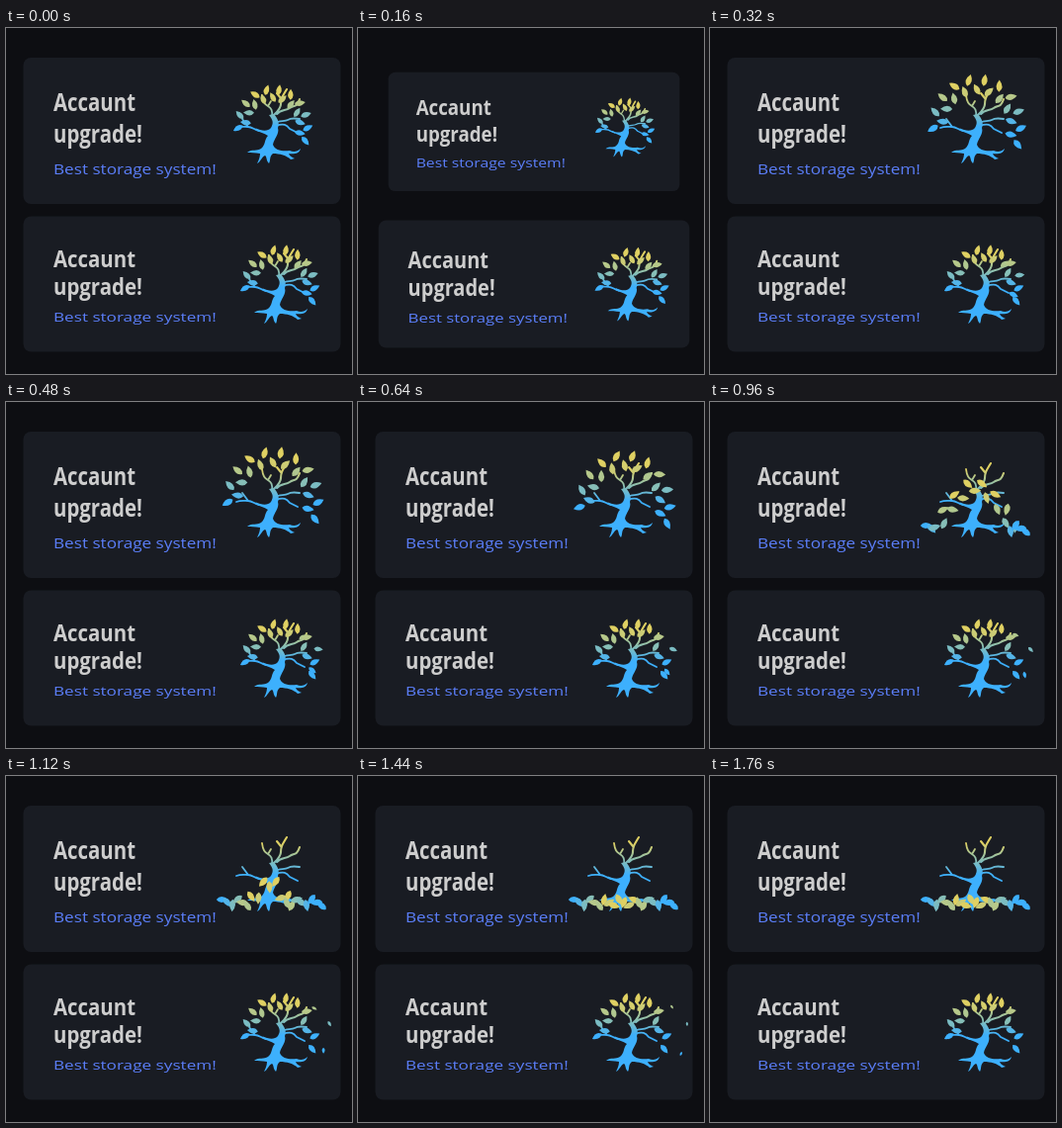
An HTML page for the animation above (1.96 s loop, 350 px wide and 350 px high).

```html
<!DOCTYPE html>
<html lang="en">
<head>
<meta charset="utf-8">
<title>Storage cards</title>
<style>
  html, body { margin: 0; width: 100%; height: 100%; overflow: hidden; background: #0d0e12; }
  svg { display: block; width: 100vw; height: 100vh; }
  text { font-family: "Open Sans", "Noto Sans", sans-serif; }
  .head { font-size: 20.4px; font-weight: 700; fill: #cdcdcd; }
  .sub { font-size: 17.15px; fill: #5b7ef8; }
  .card { fill: #191c23; }
  .twigs { fill: none; stroke: url(#bark); stroke-linecap: round; stroke-linejoin: round; }
</style>
</head>
<body>
<svg viewBox="0 0 350 350">
  <defs>
    <linearGradient id="bark" gradientUnits="userSpaceOnUse" x1="0" y1="68" x2="0" y2="100">
      <stop offset="0" stop-color="#dfd062"/>
      <stop offset="1" stop-color="#3db0fd"/>
    </linearGradient>
    <path id="leaf" d="M-5.500 0Q-1.500-5.500 5.500 0Q-1.500 5.500-5.500 0Z"/>
    <g id="tree">
      <path fill="url(#bark)" d="M244 126C249 122 254 125 258 122C263 118 261 113 265 109
        C261 106 257 106 252 103L253 101.500C258 104 265 105 268 101C271 96 270 93 266 88L271 87
        C275 92 277 96 275 101C277 107 271 112 270 118C272 124 280 125 287 124
        C291 126 295 125 298 122C297 127 291 128 286 127C287 130 290 131 292 132L288 133
        C284 129 277 127 270 127C266 130 268 134 266 137C263 134 264 130 262 129
        C258 131 258 135 254 137C256 133 257 130 257 127C252 126 248 126 244 126Z"/>
      <g class="twigs">
        <path stroke-width="1.800" d="M256 104C251 103 249 100 245 100S238 99 233 101M245 100L239 92
          M269 90C270 83 268 81 265 79S260 76 259 68M265 79L268 74
          M273 96C276 93 282 95 285 93S291 91 297 92M273 99C281 96 284 98 287 102L295 106"/>
        <path stroke-width="2.100" d="M270 89C274 85 278 82 278 77S279 70 284 62M278 71L274 66
          M274 87C278 82 283 84 287 81S294 81 297 72"/>
      </g>
    </g>
  </defs>
  <rect id="box1" class="card" x="17.500" y="30" width="321" height="148" rx="8"/>
  <g id="text1">
    <text class="head" transform="translate(48 84) scale(1 1.23)">Accaunt</text>
    <text class="head" transform="translate(48 116) scale(1 1.23)">upgrade!</text>
    <text class="sub" transform="translate(48 148) scale(1 .83)">Best storage system!</text>
  </g>
  <rect id="box2" class="card" x="17.500" y="190.500" width="321" height="137" rx="8"/>
  <g id="text2">
    <text class="head" transform="translate(48 242) scale(1 1.1)">Accaunt</text>
    <text class="head" transform="translate(48 270) scale(1 1.1)">upgrade!</text>
    <text class="sub" transform="translate(48 297) scale(1 .76)">Best storage system!</text>
  </g>
  <g id="tree1"><use href="#tree"/></g>
  <g id="tree2"><use href="#tree"/></g>
</svg>
<script>
const STEP = 160, LOOP = 1960, LAST = 11, COUNT = 21;
const CX = 270, CY = 100;

const byId = id => document.getElementById(id);
const clamp = v => Math.max(0, Math.min(1, v));
const mix = (a, b, u) => a + (b - a) * u;

// Leaves fan around the crown, alternating between an outer and an inner arc
const leaves = Array.from({ length: COUNT }, (_, i) => {
  const angle = 178 + i * 10.2, rad = angle * Math.PI / 180;
  const reach = i % 2 ? 30 : 38;
  return {
    dx: Math.cos(rad) * reach * 0.93,
    dy: Math.sin(rad) * reach,
    turn: angle + (i % 3 - 1) * 28,
    sag: 1 + Math.abs(Math.cos(rad)) / 2,
    groundX: 219 + i * 5,
    groundY: 125 + i % 3 * 3,
    windy: i > 12 && i % 3 === 1
  };
});

function grow(id) {
  return leaves.map(({ dy }) => {
    const el = document.createElementNS("http://www.w3.org/2000/svg", "use");
    el.setAttribute("href", "#leaf");
    const blue = clamp((CY + dy - 68) / 32) * 100;
    el.style.fill = `color-mix(in srgb, #3db0fd ${blue}%, #dfd062)`;
    byId(id).append(el);
    return el;
  });
}
const falling = grow("tree1"), blown = grow("tree2");

const place = (el, x, y, turn, size) =>
  el.setAttribute("transform", `translate(${x} ${y}) rotate(${turn}) scale(${size})`);

const zoom = (id, cx, cy, sx, sy, dx = 0, dy = 0) => byId(id).setAttribute("transform",
  `translate(${cx} ${cy}) scale(${sx} ${sy}) translate(${dx - cx} ${dy - cy})`);

// Upper tree: the crown bursts outward, then drops to the ground
function fall(n) {
  const burst = clamp((n - 1) * 0.87);
  const drop = 3.2 * Math.max(0, n - 3) ** 2;
  leaves.forEach((leaf, i) => {
    const spread = 1 + 0.3 * burst, size = 1 + 0.12 * burst;
    const x = CX + leaf.dx * spread;
    const y = CY + leaf.dy * spread + drop * leaf.sag;
    if (y >= leaf.groundY) place(falling[i], leaf.groundX, leaf.groundY, i * 47, size);
    else place(falling[i], mix(x, leaf.groundX, clamp(drop / 90)), y, leaf.turn + drop * 4, size);
  });
}

// Lower tree: a gust carries a few leaves off to the right
function blow(n) {
  const u = clamp((n - 1) / 10);
  leaves.forEach(({ dx, dy, turn, windy }, i) => {
    const gust = windy ? u : 0;
    place(blown[i],
      CX + dx + 28 * gust,
      CY + dy + (dy + 14) * 0.8 * gust,
      turn + 130 * gust,
      gust < 1 ? 1 - 0.75 * gust : 0);
  });
}

function pose(n) {
  const pick = small => n === 1 ? small : 1;
  const shift = n === 1 ? 1 : 0;
  zoom("box1", 178, 104.5, pick(0.918), pick(0.813), 0, shift);
  zoom("text1", 178, 104.5, pick(0.918), pick(0.825), 0, shift);
  zoom("box2", 178, 259.5, pick(0.98), pick(0.942));
  zoom("text2", 178, 259.5, pick(0.98), 1, 0, shift);
  zoom("tree1", 270, 111, pick(0.75), pick(0.75));
  zoom("tree2", 277, 260, pick(0.935), pick(0.935), 7, 162);
  fall(n);
  blow(n);
}

let shown = -1;
function tick() {
  const n = Math.min(LAST, Math.floor(performance.now() % LOOP / STEP));
  if (n !== shown) pose(shown = n);
  requestAnimationFrame(tick);
}
tick();
</script>
</body>
</html>
```
